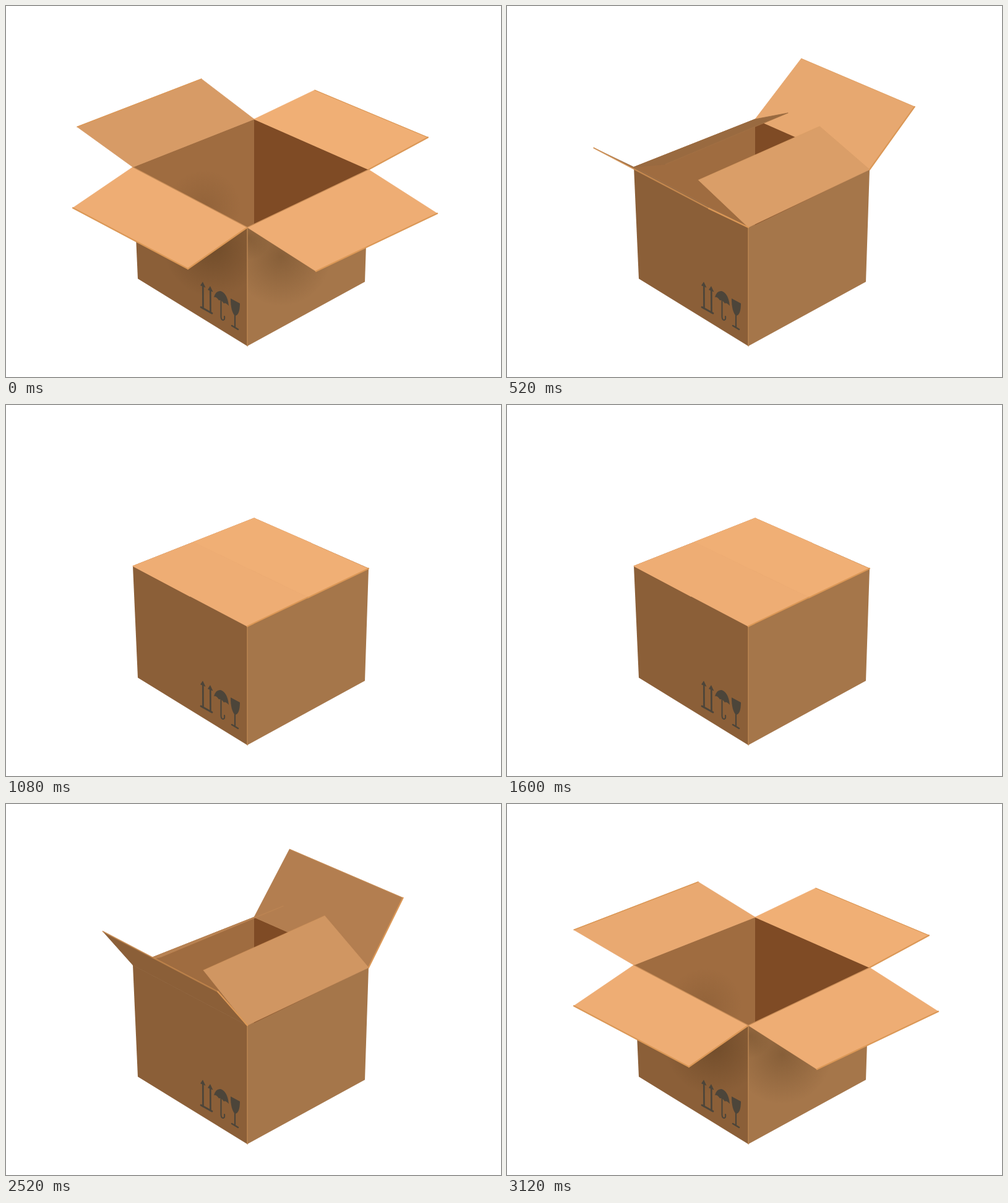
An HTML page with a canvas that plays this animation: 800 px wide and 600 px high, repeating every 4040 ms.

```html
<!DOCTYPE html>
<html lang="en">
<head>
<meta charset="utf-8">
<title>Cardboard box</title>
<style>
html, body { margin: 0; height: 100%; overflow: hidden; background: #fff; }
canvas { display: block; }
</style>
</head>
<body>
<canvas id="stage" width="800" height="600"></canvas>
<script>
const ctx = document.getElementById('stage').getContext('2d');
const LOOP = 4040, STEP = 40;

// Rim corners: left, back, right, front; then the base
const L = [205, 260.5], B = [401, 183], R = [586, 264.5], F = [390, 358];
const baseL = [213, 441], baseR = [580, 446], baseF = [390, 550], inner = [401, 354];

// hinge: two ends; path: tip offset at the first end, from open to closed in even steps
// skew: extra tip offset at the second end, open and closed
// dim: darkening at mid swing while closing and while opening
const backLeft = {
  hinge: [L, B], path: [[-97, -57], [-58, -98], [-12, -91], [45, -13], [92, 49]],
  skew: [[5, 0], [0, -9]], close: [-32, 675], open: [2320, 3120],
  dim: [1.25, .7], lit: .93, tip: 1.5
};
const backRight = {
  hinge: [B, R], path: [[98, -47], [86, -87], [32, -116], [-45, -75], [-98, 38.5]],
  skew: [[-2, -5], [0, 8.5]], close: [275, 1040], open: [2160, 2760],
  dim: [.1, .64], lit: 1, tip: 1.2, end: 2.2
};
const frontRight = {
  hinge: [F, R], path: [[111, 71], [83, -25], [17, -87], [-65, -92], [-92, -49]],
  skew: [[0, 0], [0, 9]], close: [0, 605], open: [2363, 3077],
  dim: [.36, .36], lit: .98, tip: 2.4
};
const frontLeft = {
  hinge: [L, F], path: [[-97, 66], [-62, -36], [0, -92], [68, -94], [98, -38.5]],
  skew: [[1, 1], [0, -8.5]], close: [348, 1080], open: [2080, 2720],
  dim: [1.2, 1.2], lit: .98, tip: 2.2, end: 2.4
};

const clamp = v => Math.max(0, Math.min(1, v));
const mix = (a, b, k) => a + (b - a) * k;
const ramp = (t, [from, to]) => clamp((t - from) / (to - from));

// Catmull-Rom curve through evenly spaced points
function along(path, p, axis) {
  const last = path.length - 1, i = Math.min(Math.floor(p * last), last - 1), u = p * last - i;
  const b = path[i][axis], c = path[i + 1][axis];
  const a = i ? path[i - 1][axis] : 2 * b - c;
  const d = i + 2 <= last ? path[i + 2][axis] : 2 * c - b;
  return b + u / 2 * (c - a + u * (2 * a - 5 * b + 4 * c - d + u * (3 * (b - c) + d - a)));
}

function swing(flap, t) {
  const p = ramp(t, flap.close) - ramp(t, flap.open);
  const tip = [0, 1].map(axis => along(flap.path, p, axis));
  const skew = [0, 1].map(axis => mix(flap.skew[0][axis], flap.skew[1][axis], p * p));
  const dim = flap.dim[t < LOOP / 2 ? 0 : 1];
  return { ...flap, p, tipAt: tip, skewAt: skew, light: flap.lit - dim * Math.sin(Math.PI * p) };
}

function shade(light) {
  const dark = [139, 95, 56], bright = [240, 175, 117];
  return `rgb(${dark.map((d, i) => Math.round(mix(d, bright[i], clamp(light))))})`;
}

function trace(pts) {
  ctx.beginPath();
  pts.forEach(p => ctx.lineTo(...p));
}

function poly(color, ...pts) {
  trace(pts);
  ctx.fillStyle = color;
  ctx.fill();
}

function line(color, width, ...pts) {
  trace(pts);
  ctx.strokeStyle = color;
  ctx.lineWidth = width;
  ctx.stroke();
}

// Soft shadow kept within a face
function shadow(x, y, r, alpha, ...face) {
  const g = ctx.createRadialGradient(x, y, 0, x, y, r);
  g.addColorStop(0, `rgba(82,54,26,${alpha})`);
  g.addColorStop(1, 'rgba(82,54,26,0)');
  poly(g, ...face);
}

function drawFlap({ hinge: [a, b], p, tipAt: [x, y], skewAt: [sx, sy], light, tip, end }) {
  const ta = [a[0] + x, a[1] + y], tb = [b[0] + x + sx, b[1] + y + sy];
  const fill = shade(light);
  poly(fill, a, b, tb, ta);
  line(fill, .8, a, b, tb, ta, a);
  ctx.globalAlpha = (1 - p) ** 1.5;
  line('#db9857', tip, ta, tb);
  ctx.globalAlpha = 1;
  if (end) line('#db9857', end, b, tb);
}

function drawIcons() {
  const ink = '#4c453a';
  for (const [x, y] of [[318, 446], [330, 453]]) {
    poly(ink, [x, y], [x + 4.5, y + 9.5], [x - 4, y + 6]);
    line(ink, 2.7, [x + .3, y + 5], [x + .5, y + 43]);
  }
  line(ink, 2.8, [315, 487], [333, 497]);

  ctx.fillStyle = ctx.strokeStyle = ink;
  ctx.fill(new Path2D('M336 471Q339 460 347 461Q358 465 360 485Q355 479 352 481Q348 475 344 476Q340 470 336 471Z'));
  ctx.lineWidth = 2.1;
  ctx.stroke(new Path2D('M347.5 474V503Q348 508 351 508Q354 507 353 502'));

  ctx.fill(new Path2D('M363 473L378 481Q378 500 370 501Q363 494 363 473Z'));
  line(ink, 2.2, [370, 499], [370, 519]);
  line(ink, 2.5, [365, 517], [375, 523]);
}

function draw(t) {
  const [bl, br, fr, fl] = [backLeft, backRight, frontRight, frontLeft].map(f => swing(f, t));
  fr.light *= 1 - .9 * fl.p ** 2; // lies in the shade of the flap above
  const leftDown = clamp(fl.tipAt[1] / 66), rightDown = clamp(fr.tipAt[1] / 71);

  ctx.fillStyle = '#fff';
  ctx.fillRect(0, 0, 800, 600);

  const left = [L, F, baseF, baseL], right = [F, R, baseR, baseF];
  poly('#8b5f38', ...left);
  poly('#a5764a', ...right);
  shadow(335, 390, 80, .45 * leftDown, ...left);
  shadow(392, 375, 36, .3 * leftDown, ...right);
  shadow(445, 405, 80, .36 * rightDown, ...right);
  line('#bd8854', 1.4, F, baseF);
  drawIcons();

  const wall = [L, B, inner, F];
  poly('#9f6c40', ...wall);
  poly('#7f4b25', B, R, inner);
  shadow(320, 325, 60, .16 * leftDown, ...wall);
  line('#b17c4b', 1, L, B, R);

  // The back right flap lies above its neighbours once it leans inwards
  const leansIn = br.tipAt[0] < 0;
  for (const flap of leansIn ? [bl, fr, br, fl] : [br, bl, fr, fl]) drawFlap(flap);

  ctx.globalAlpha = leftDown;
  line('#c58a54', 1.2, L, F);
  ctx.globalAlpha = rightDown;
  line('#c58a54', 1.2, F, R);
  ctx.globalAlpha = 1;
}

ctx.lineJoin = ctx.lineCap = 'round';
const start = performance.now();
function tick() {
  const t = (performance.now() - start) % LOOP;
  draw(Math.floor(t / STEP) * STEP);
  requestAnimationFrame(tick);
}
tick();
</script>
</body>
</html>
```
